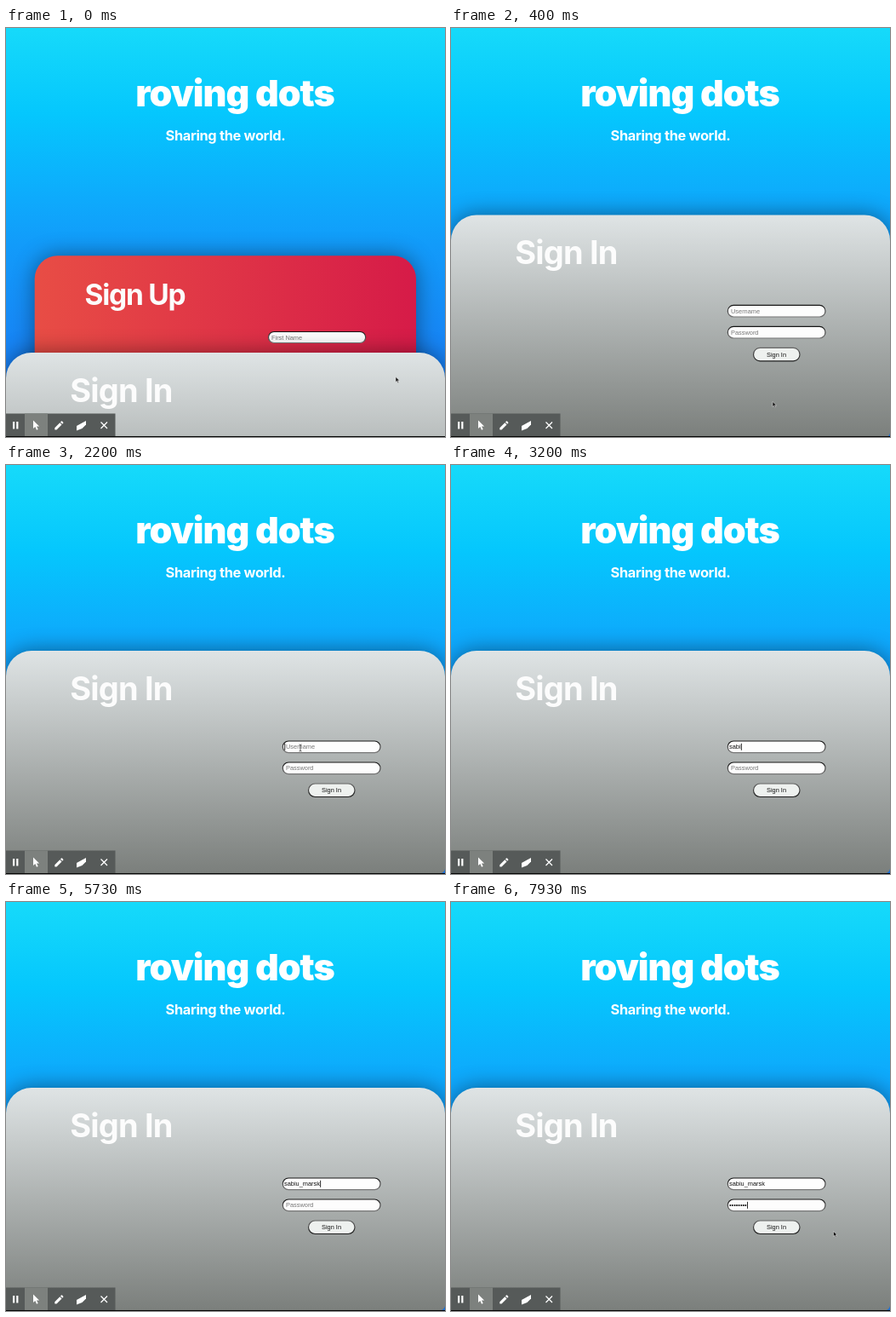
These frames come from a looping animation (516x480 px, 8 s). An HTML page:

```html
<!DOCTYPE html>
<html lang="en">
<head>
<meta charset="utf-8">
<title>Sign in</title>
<style>
  html, body { margin: 0; width: 100%; height: 100%; overflow: hidden; background: #000; }
  svg { display: block; width: 516px; height: 480px; }
  .bold { font-family: Inter, "Open Sans", sans-serif; font-weight: 700; fill: #fcfcfc; }
  .title { font-size: 43px; font-weight: 900; letter-spacing: -1px; text-anchor: middle; fill: #fff; }
  .tagline { font-size: 16.4px; letter-spacing: -.33px; text-anchor: middle; fill: #fff; }
  .small { font: 7.4px "Liberation Sans", Arial, sans-serif; fill: #111; }
  .hint { fill: #777; }
  .shadow { filter: drop-shadow(0 0 13px rgba(0, 0, 0, .43)); }
  .field { fill: #fdfdfd; stroke: url(#inset); stroke-width: 1.2; }
  .button { fill: #eef1ef; stroke: url(#outset); stroke-width: 1.2; }
</style>
</head>
<body>
<svg viewBox="0 0 516 480">
  <defs>
    <linearGradient id="sky" x2="0" y2="1">
      <stop offset="0" stop-color="#16dafa"/>
      <stop offset=".21" stop-color="#05c7fd"/>
      <stop offset=".42" stop-color="#0eaafc"/>
      <stop offset=".53" stop-color="#129bfa"/>
      <stop offset="1" stop-color="#1c70f0"/>
    </linearGradient>
    <linearGradient id="red">
      <stop offset="0" stop-color="#e84d45"/>
      <stop offset="1" stop-color="#d61b48"/>
    </linearGradient>
    <linearGradient id="grey" x2="0" y2="1">
      <stop offset="0" stop-color="#dfe4e5"/>
      <stop offset="1" stop-color="#7b7f7c"/>
    </linearGradient>
    <linearGradient id="inset" x2="0" y2="1">
      <stop offset="0" stop-color="#161616"/>
      <stop offset="1" stop-color="#777"/>
    </linearGradient>
    <linearGradient id="outset" x2="0" y2="1">
      <stop offset="0" stop-color="#666"/>
      <stop offset="1" stop-color="#1c1c1c"/>
    </linearGradient>
  </defs>

  <rect width="516" height="480" fill="url(#sky)"/>
  <text class="bold title" x="269" y="92">roving dots</text>
  <text class="bold tagline" x="258" y="131.5">Sharing the world.</text>

  <g id="signUp">
    <rect class="shadow" x="33.7" y="267.3" width="448.3" height="260" rx="27" fill="url(#red)"/>
    <text class="bold" x="92.5" y="324.5" font-size="33.5" letter-spacing="-1.25">Sign Up</text>
    <rect class="field" x="308.5" y="356.5" width="114.2" height="13" rx="6.5"/>
    <text class="small hint" x="312" y="365.7">First Name</text>
  </g>

  <g id="signIn">
    <path class="shadow" d="M0 479V248a30 30 0 0 1 30-30H486a30 30 0 0 1 30 30V479Z" fill="url(#grey)"/>
    <path d="M516 474v5h-4q3-1 4-5" fill="#1a6fd8"/>
    <text class="bold" x="75.3" y="275.5" font-size="38" letter-spacing="-.85">Sign In</text>
    <rect class="field" x="325.3" y="324" width="114.7" height="13.6" rx="6.8"/>
    <rect class="field" x="325.3" y="349" width="114.7" height="13.6" rx="6.8"/>
    <text id="user" class="small" y="333.4"></text>
    <text id="pass" class="small" y="358.4"></text>
    <rect id="caret" width=".9" height="8" fill="#111"/>
    <rect class="button" x="355.5" y="374" width="54.5" height="15.5" rx="7.75"/>
    <text class="small" x="382.5" y="384.4" text-anchor="middle">Sign In</text>
  </g>

  <circle id="ring" cx="346" cy="333" fill="none" stroke="#dc4f60" stroke-width="1.7"/>
  <g id="pointer">
    <path id="arrow" d="M0 0v6l1.5-1.3 1.1 2.2 1-.5-1.1-2.1h2Z" fill="#111" stroke="#eee" stroke-width=".5"/>
    <path id="beam" d="M-1.5-4Q0-4 0-3Q0-4 1.5-4M0-3V3M-1.5 4Q0 4 0 3Q0 4 1.5 4" fill="none" stroke="#333" stroke-width=".8"/>
  </g>

  <g fill="#fff">
    <rect y="452.5" width="128.5" height="27" fill="#565a59"/>
    <rect x="22" y="452.5" width="27" height="27" fill="#7d817e"/>
    <path d="M8 462h2.2v8.5H8ZM12.2 462h2.2v8.5h-2.2Z"/>
    <path d="M32 460.5v9.5l2.3-2 1.7 3.8 1.7-.8-1.7-3.6h3.1Z"/>
    <path d="M57.3 471.5v-2.2l6-6 2.2 2.2-6 6ZM64 462.6l1-1q.5-.5 1 0l1.2 1.2q.5.5 0 1l-1 1Z"/>
    <path d="M83 467l11-6v4.5l-4.5 4.5-6.5 2.5Z"/>
    <path d="M111.5 462.5l7.5 7.5m0-7.5l-7.5 7.5" stroke="#fff" stroke-width="1.3"/>
  </g>
  <rect y="479" width="516" height="1" fill="#050505"/>
</svg>

<script>
const LOOP = 8000, TICK = 1000 / 15;
const NAME = "sabiu_marsk";
const NAME_KEYS = [2400, 2650, 2860, 3060, 3600, 4500, 4930, 5100, 5260, 5430, 5600];
const PASS_KEYS = [6200, 6330, 6450, 6560, 6680, 6760, 6830, 6900];
const FOCUS = 1190, TAB = 6000, SLIDE = 163;
// Pointer stops: time, x, y
const PATH = [[0, 458, 409.5], [400, 378, 438.5], [930, 346, 332], [7500, 346, 332], [7930, 449.5, 386.5], [8000, 452, 387]];

const el = id => document.getElementById(id);
const show = (id, on) => el(id).setAttribute("visibility", on ? "visible" : "hidden");
const place = (id, x, y) => el(id).setAttribute("transform", `translate(${x} ${y})`);
const clamp = v => Math.min(1, Math.max(0, v));
const smooth = v => v * v * (3 - 2 * v);
const typed = (keys, t) => keys.filter(k => k <= t).length;

// CSS "ease": cubic-bezier(.25, .1, .25, 1), solved by bisection
function ease(x) {
  const curve = (a, b, s) => 3 * a * s * (1 - s) ** 2 + 3 * b * s * s * (1 - s) + s ** 3;
  let lo = 0, hi = 1;
  for (let i = 0; i < 24; i++) {
    const mid = (lo + hi) / 2;
    if (curve(.25, .25, mid) < x) lo = mid; else hi = mid;
  }
  return curve(.1, 1, lo);
}

function setField(id, value, hint) {
  const node = el(id);
  node.textContent = value || hint;
  node.setAttribute("x", value ? 327 : 329);
  node.classList.toggle("hint", !value);
  return 327.3 + (value ? node.getComputedTextLength() : 0);
}

function pointerAt(t) {
  const i = Math.max(1, PATH.findIndex(p => p[0] >= t));
  const [t0, x0, y0] = PATH[i - 1], [t1, x1, y1] = PATH[i];
  const k = smooth(clamp((t - t0) / (t1 - t0)));
  return [x0 + (x1 - x0) * k, y0 + (y1 - y0) * k];
}

function draw(t) {
  place("signIn", 0, SLIDE * (1 - ease(clamp((t - 40) / 410))));

  const userEnd = setField("user", NAME.slice(0, typed(NAME_KEYS, t)), "Username");
  const passEnd = setField("pass", "•".repeat(typed(PASS_KEYS, t)), "Password");
  const lastInput = [FOCUS, ...NAME_KEYS, TAB, ...PASS_KEYS].filter(k => k <= t).pop();
  const inPass = t >= TAB;
  el("caret").setAttribute("x", inPass ? passEnd : userEnd);
  el("caret").setAttribute("y", inPass ? 351.8 : 326.8);
  show("caret", t >= FOCUS && (t - lastInput) % 1000 < 500);

  const click = (t - 1130) / 400;
  show("ring", click >= 0 && click < 1);
  el("ring").setAttribute("r", 12 + 3 * clamp(click * 3));
  el("ring").setAttribute("opacity", .9 * clamp(2.4 * (1 - click)));

  const [x, y] = pointerAt(t);
  const overField = t > 500 && x > 325 && x < 440 && (Math.abs(y - 331) < 7 || Math.abs(y - 356) < 7);
  const visible = t < NAME_KEYS[0] || t >= 7500;
  place("pointer", x, y);
  show("arrow", visible && !overField);
  show("beam", visible && overField);
}

const start = performance.now();
function frame() {
  const t = (performance.now() - start) % LOOP;
  draw(Math.floor((t + 7) / TICK) * TICK % LOOP);
  requestAnimationFrame(frame);
}
frame();
</script>
</body>
</html>
```
